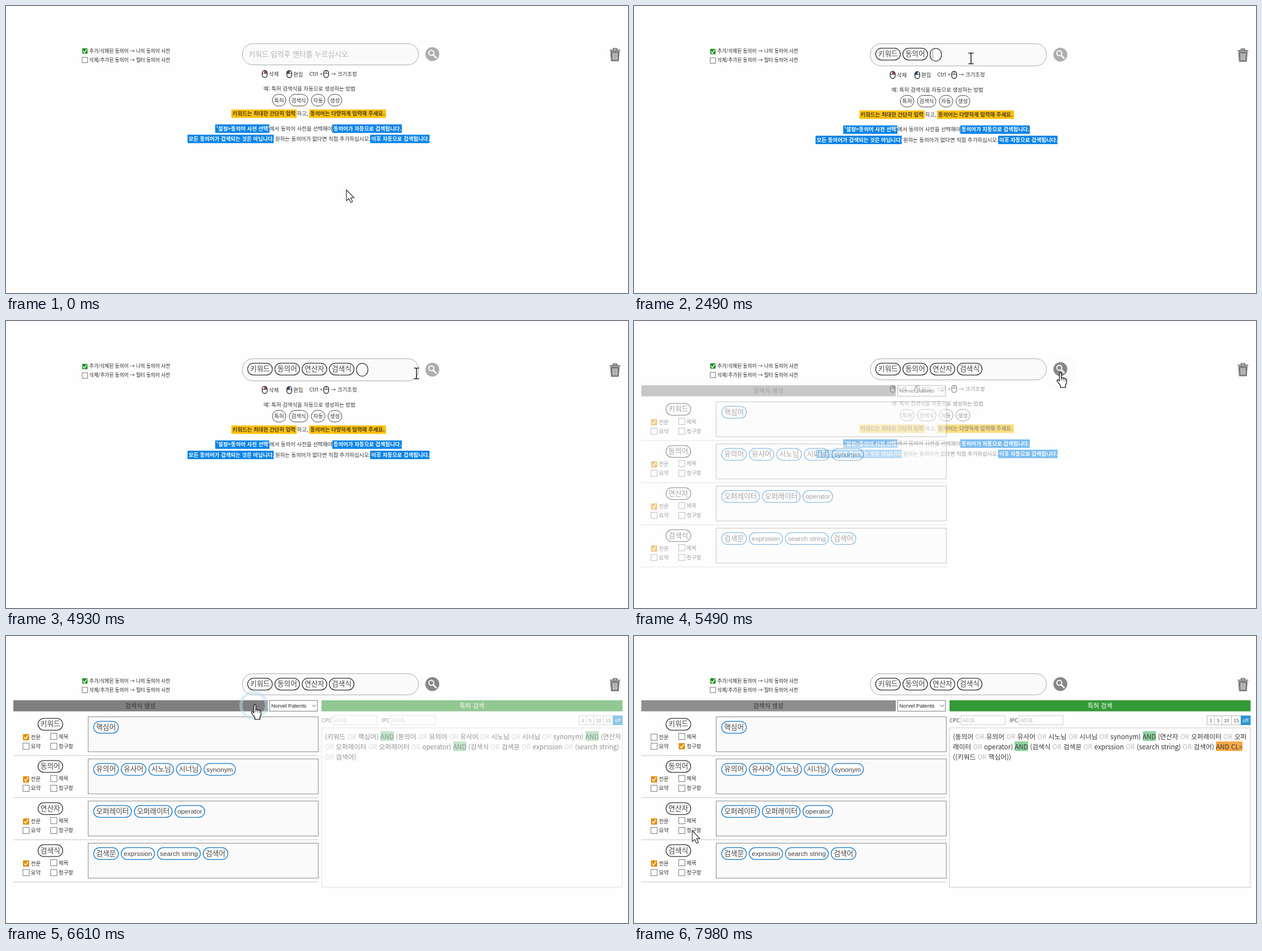
Recreate the animation shown at these times as an HTML page. Size 1100 by 509 pixels, loop 8000 ms.

```html
<!DOCTYPE html>
<html lang="ko">
<head>
<meta charset="utf-8">
<style>
  html, body { margin: 0; width: 100%; height: 100%; overflow: hidden; background: #fefefe; }
  svg { display: block; width: 100vw; height: 100vh; }
  text, .query { font-family: "Noto Sans CJK KR", "Noto Sans CJK", sans-serif; white-space: pre; }
  text.latin { font-family: "Liberation Sans", Arial, sans-serif; }
  .query { font-size: 11.7px; line-height: 17.7px; color: #333; }
  .query i { font-style: normal; color: #bbb; }
  .query b { font-weight: 400; background: #8fd3a0; }
  .query b.claim { background: #f6aa49; }
</style>
</head>
<body>
<svg id="stage" viewBox="0 0 1100 509"></svg>
<script>
const LOOP = 8000;
const HANGUL = '"Noto Sans CJK KR","Noto Sans CJK",sans-serif';
const LATIN = '"Liberation Sans",Arial,sans-serif';
const CLICKS = [[800, 594, 92], [5110, 753, 92], [6330, 438, 123], [7390, 87, 196]];
const FOCUS = 840, SEARCH = 5200, GENERATE = 6350, CLAIM = 7430;

// Each word: start time, time of Enter, states of the syllable composition
const WORDS = [
  [1390, 1840, 'ㅋ 키 킹 키우 키워 키웓 키워드'],
  [1930, 2480, 'ㄷ 도 동 동ㅇ 동으 동의 동읭 동의어'],
  [2620, 3130, 'ㅇ 여 연 연ㅅ 연사 연산 연산ㅈ 연산자'],
  [3210, 3800, 'ㄱ 거 검 검ㅅ 검새 검색 검색ㅅ 검색시 검색식'],
].map(([start, end, states]) => ({ start, end, states: states.split(' ') }));

const ROWS = [
  ['키워드', '핵심어'],
  ['동의어', '유의어', '유사어', '시노님', '시너님', 'synonym'],
  ['연산자', '오퍼레이터', '오퍼래이터', 'operator'],
  ['검색식', '검색문', 'exprssion', 'search string', '검색어'],
];

const POINTER = [
  [0, 602, 326], [220, 602, 326], [780, 596, 93], [4610, 596, 93], [4930, 726, 93],
  [5080, 754, 92], [5950, 754, 92], [6300, 440, 122], [6800, 440, 122],
  [7330, 86, 195], [7760, 86, 195], [7900, 97, 268], [7980, 103, 345], [8000, 104, 350],
];

const pen = document.createElement('canvas').getContext('2d');
const isLatin = s => /^[a-z ]+$/.test(s);
const clamp = v => Math.max(0, Math.min(1, v));
const swing = (t, start, length) => .5 - Math.cos(clamp((t - start) / length) * Math.PI) / 2;

const text = (x, y, s, size = 9.4, fill = '#333', extra = '') =>
  `<text x="${x}" y="${y}" font-size="${size}" fill="${fill}" ${extra}>${s}</text>`;
const rect = (x, y, w, h, fill, stroke = 'none', extra = '') =>
  `<rect x="${x}" y="${y}" width="${w}" height="${h}" fill="${fill}" stroke="${stroke}" ${extra}/>`;
const path = (d, stroke, width = 1, fill = 'none') =>
  `<path d="${d}" stroke="${stroke}" stroke-width="${width}" fill="${fill}" stroke-linecap="round" stroke-linejoin="round"/>`;
const group = (id, body, extra = '') => `<g id="${id}" ${extra}>${body}</g>`;
const MIDDLE = 'text-anchor="middle"';

function textWidth(s) {
  pen.font = isLatin(s) ? `11.7px ${LATIN}` : `12.6px ${HANGUL}`;
  return pen.measureText(s).width;
}

function pill(x, cy, s, stroke) {
  const w = textWidth(s) + 9;
  const latin = isLatin(s);
  return {
    w,
    svg: rect(x, cy - 10.5, w, 21, '#fcfcfc', stroke, 'rx="10.5" stroke-width="1.25"') +
      text(x + 4.5, cy + (latin ? 4 : 3.8), s, latin ? 11.7 : 12.6, '#444', latin ? 'class="latin"' : ''),
  };
}

function pillRow(x, cy, words, stroke, gap) {
  let svg = '';
  for (const word of words) {
    const p = pill(x, cy, word, stroke);
    svg += p.svg;
    x += p.w + gap;
  }
  return { svg, x };
}

function checkbox(cx, cy, color, size = 11) {
  const h = size / 2;
  return color
    ? rect(cx - h, cy - h, size, size, color, 'none', 'rx="1"') +
      path(`M${cx - 3} ${cy + .4}l2.2 2.6 4-6`, '#fff', 1.5)
    : rect(cx - h, cy - h, size, size, '#fff', '#777', 'stroke-width="1"');
}

function mouseIcon(cx, cy, left, right) {
  const l = cx - 4.3, r = cx + 4.3, top = cy - 6;
  return path(`M${l} ${cy - 1}v-1a4.3 4 0 0 1 4.3-4v5z`, 'none', 0, left) +
    path(`M${r} ${cy - 1}v-1a4.3 4 0 0 0-4.3-4v5z`, 'none', 0, right) +
    rect(l, top, 8.6, 12.4, 'none', '#222', 'rx="4.2" stroke-width="1.3"') +
    path(`M${l} ${cy - 1}H${r}M${cx} ${top}V${cy - 1}`, '#222', .9);
}

function marked(x, y, w, s, fill, color) {
  return rect(x, y - 10.5, w, 15, fill, 'none', 'rx="1"') +
    text(x + 2, y, s, 9.4, color, 'font-weight="700"');
}

function options() {
  return checkbox(139.5, 79.8, '#219021', 9.5) + checkbox(139.5, 95.8, '', 9.5) +
    text(147.5, 82.6, '추가/삭제된 동의어 → 나의 동의어 사전', 8.6, '#222', 'font-weight="500"') +
    text(147.5, 98.6, '삭제/추가된 동의어 → 필터 동의어 사전', 8.6, '#222', 'font-weight="500"');
}

function icons() {
  const trash = path('M1068.5 78.5h17M1074 78v-2.5h6V78', '#7a7a7a', 2.2) +
    path('M1069.5 80.5h15l-1.2 17h-12.6z', '#7a7a7a', 1, '#7a7a7a') +
    path('M1073.7 83.5l.4 11.5M1077 83.5V95M1080.3 83.5l-.4 11.5', '#fff', 1.3);
  return '<circle id="lens" cx="754" cy="85.3" r="12.3"/>' +
    '<circle cx="752.2" cy="83" r="4.4" fill="none" stroke="#fff" stroke-width="2"/>' +
    path('M755.8 86.8l4.6 4.8', '#fff', 2.8) + trash;
}

function help() {
  const blue = '#0984e6', yellow = '#fdc20c';
  const examples = [['특허', 471, 24], ['검색식', 501, 33], ['자동', 540, 24], ['생성', 569.5, 24.5]];
  return mouseIcon(457.5, 120.3, 'none', '#d44') + text(465, 124.3, '삭제') +
    mouseIcon(501, 120.6, '#2563b0', 'none') + text(508, 124.6, '편집') +
    text(536.5, 123.6, 'Ctrl +') + mouseIcon(566.2, 120.3, 'none', 'none') +
    text(574, 123.6, '→ 크기조정') +
    text(455.5, 150, '예: 특허 검색식을 자동으로 생성하는 방법') +
    examples.map(([s, x, w]) => rect(x, 156.7, w, 20.6, '#fff', '#444', 'rx="10.3"') +
      text(x + w / 2, 170.5, s, 9.4, '#333', MIDDLE)).join('') +
    marked(398.5, 194, 115.5, '키워드는 최대한 간단히 입력', yellow, '#4a3d1c') +
    text(514.5, 194, '하고,') +
    marked(536, 194, 136, '동의어는 다양하게 입력해 주세요.', yellow, '#4a3d1c') +
    marked(370, 220.5, 96, "'설정&gt;동의어 사전 선택'", blue, '#fff') +
    text(466, 220.5, '에서 동의어 사전을 선택해야') +
    marked(577, 220.5, 123, '동의어가 자동으로 검색됩니다.', blue, '#fff') +
    marked(321, 238.8, 152.5, '모든 동의어가 검색되는 것은 아닙니다.', blue, '#fff') +
    text(476, 238.8, '원하는 동의어가 없다면 직접 추가하십시오.') +
    marked(644, 238.8, 105, '이후 자동으로 검색됩니다.', blue, '#fff');
}

function resultRow([keyword, ...synonyms], i) {
  const y = i * 74.7;
  const orange = '#e18f0a';
  const boxes = (whole, claim) => checkbox(35.5, 179.5 + y, whole) + checkbox(84.5, 178 + y) +
    checkbox(35.5, 195.5 + y) + checkbox(84.5, 195.5 + y, claim);
  const labels = [['전문', 44, 182.5], ['제목', 93, 181.5], ['요약', 44, 198.7], ['청구항', 93, 198.7]];
  return pill(78.5 - (textWidth(keyword) + 9) / 2, 156.6 + y, keyword, '#333').svg +
    (i ? boxes(orange, '') : group('wholeOn', boxes(orange, '')) + group('claimOn', boxes('', orange))) +
    labels.map(([s, x, ly]) => text(x, ly + y, s, 9.4, '#333', 'font-weight="500"')).join('') +
    rect(145.3, 143.3 + y, 407, 62, '#fafafa', '#888') +
    pillRow(155, 161.8 + y, synonyms, '#1478c8', 5).svg +
    path(`M13 ${212 + y}H552`, '#c4c4c4');
}

function results() {
  return rect(13, 114, 450, 19.6, '#8e8e8e', 'none', 'id="bar"') +
    text(237.5, 127.8, '검색식 생성', 11, '#333', MIDDLE) +
    rect(466.2, 114.3, 84.5, 19, '#fff', '#777') +
    text(469, 127.2, 'Norvel Patents', 9.5, '#222', 'class="latin"') +
    path('M542 122.5l2.8 2.8 2.8-2.8', '#444') +
    ROWS.map(resultRow).join('');
}

const query = (id, html) => `<foreignObject id="${id}" x="564" y="169.2" width="536" height="270">
  <div class="query" xmlns="http://www.w3.org/1999/xhtml">${html
    .replace(/\bAND CL=/g, '<b class="claim">AND CL=</b>')
    .replace(/\bAND\b(?! CL)/g, '<b>AND</b>')
    .replace(/\bOR\b/g, '<i>OR</i>')
    .replace(/\n/g, '<br/>')}</div></foreignObject>`;

function searchPanel() {
  const field = (x, label, bx) => text(x, 153.3, label, 9.6, '#444') +
    rect(bx, 141.4, 78, 16, '#fff', '#ccc') + text(bx + 3, 152.8, 'A01B..', 8.6, '#b5b5b5');
  const steps = [['3', 1013.5, 13], ['5', 1026.5, 13], ['10', 1039.5, 17], ['15', 1056.5, 17], ['off', 1073.5, 16.5]];
  return rect(558, 114, 532.5, 19.6, '#359a38') +
    text(824, 127.8, '특허 검색', 11, '#fff', MIDDLE) +
    field(558, 'CPC', 578.3) + field(664, 'IPC', 680.8) +
    steps.map(([s, x, w]) => rect(x, 141.5, w, 16, s === 'off' ? '#2b97d3' : '#fff', s === 'off' ? '#2b97d3' : '#bbb') +
      text(x + w / 2, 152.6, s, 8, s === 'off' ? '#fff' : '#444', MIDDLE)).join('') +
    rect(558, 163, 532, 282.5, '#fff', '#c8c8c8') +
    query('queryAll', '(키워드 OR 핵심어) AND (동의어 OR 유의어 OR 유사어 OR 시노님 OR 시너님 OR synonym) AND (연산자\n' +
      'OR 오퍼레이터 OR 오퍼래이터 OR operator) AND (검색식 OR 검색문 OR exprssion OR (search string)\nOR 검색어)') +
    query('queryClaim', '(동의어 OR 유의어 OR 유사어 OR 시노님 OR 시너님 OR synonym) AND (연산자 OR 오퍼레이터 OR 오퍼\n' +
      '래이터 OR operator) AND (검색식 OR 검색문 OR exprssion OR (search string) OR 검색어) AND CL=\n((키워드 OR 핵심어))');
}

const CURSORS = {
  arrow: path('M0 0v19.5l4.4-4 3.2 7 3.3-1.5-3.2-6.8h5.8z', '#333', 1.2, '#fff'),
  beam: path('M-4-9.5h2.8q1.2 0 1.2 1.2 0-1.2 1.2-1.2H4M0-8.5v17M-4 9.5h2.8Q0 9.5 0 8.3q0 1.2 1.2 1.2H4', '#222', 1.5),
  hand: path('M-1.6 1.2a1.7 1.7 0 0 1 3.4 0v8l1.2-.6 2 .6 1.2-.2 1.8.9 1.4.1 1.5 1.7v6l-1.8 4.2v4H.2v-3.2L-5 15.6q-1.6-2.2-.3-3.2 1.4-.8 2.6.6l1.1 1.2z', '#222', 1.4, '#fff') +
    path('M1.8 9v4M5 10v3.4M8.2 11v3', '#222', .9),
};

const stage = document.getElementById('stage');
stage.innerHTML =
  group('options', options()) +
  rect(418, 66.8, 311.5, 37.6, '#fafafa', '#aaa', 'id="field" rx="18.8"') +
  group('entry', '') + group('icons', icons()) + group('help', help()) +
  group('results', results()) + group('panel', searchPanel()) +
  '<circle id="ring" fill="none" stroke="#b9dfe9" stroke-width="5.5"/>' +
  group('cursor', Object.entries(CURSORS).map(([id, body]) => group(id, body)).join(''));

const el = {};
stage.querySelectorAll('[id]').forEach(node => el[node.id] = node);
const set = (id, name, value) => el[id].setAttribute(name, value);
const show = (id, on) => set(id, 'visibility', on ? 'visible' : 'hidden');
const fade = (id, opacity) => { set(id, 'opacity', opacity); show(id, opacity > 0); };

function typedAt(t) {
  const done = WORDS.filter(w => t >= w.end).map(w => w.states.at(-1));
  const word = WORDS.find(w => t >= w.start && t < w.end);
  if (!word) return { done, draft: '' };
  const pace = (word.end - word.start - 40) / word.states.length;
  const i = Math.min(word.states.length - 1, Math.floor((t - word.start) / pace));
  return { done, draft: word.states[i] };
}

function entryMarkup(t, done, draft) {
  if (t < FOCUS) return text(429, 89.7, '키워드 입력후 엔터를 누르십시오.', 12.8, '#b4b4b4');
  const row = pillRow(427.3, 85.3, draft ? [...done, draft] : done, '#333', 4.4);
  if (t >= SEARCH) return row.svg;
  const caretOn = !(t >= 4100 && t < 4440) && t < 4910;
  const caretX = draft ? row.x - 8.5 : row.x + 4.8;
  return row.svg +
    (draft ? '' : rect(row.x, 75, 20, 22.8, '#fcfcfc', '#333', 'rx="10" stroke-width="1.25"')) +
    (caretOn ? path(`M${caretX} 79.5v13.5`, '#888', .9) : '');
}

function pointerAt(t) {
  const i = POINTER.findIndex(p => p[0] > t);
  const [t0, x0, y0] = POINTER[i - 1], [t1, x1, y1] = POINTER[i];
  const k = t1 - t0 > 130 && t < 7760 ? swing(t, t0, t1 - t0) : (t - t0) / (t1 - t0);
  return [x0 + (x1 - x0) * k, y0 + (y1 - y0) * k];
}

function cursorKind(t, x, y) {
  if (Math.hypot(x - 754, y - 86) < 13) return 'hand';
  if (x > 418 && x < 730 && y > 66 && y < 106) return 'beam';
  const overBar = t > SEARCH && x < 463 && y > 113 && y < 134;
  const overBox = t > SEARCH && x > 79 && x < 119 && y > 188 && y < 202;
  return overBar || overBox ? 'hand' : 'arrow';
}

let lastEntry = '';
function draw(t) {
  const { done, draft } = typedAt(t);
  const tall = t >= FOCUS && t < SEARCH && !draft;
  const markup = entryMarkup(t, done, draft);
  if (markup !== lastEntry) el.entry.innerHTML = lastEntry = markup;
  set('field', 'height', tall ? 39.4 : 37.6);
  for (const id of ['options', 'icons']) set(id, 'transform', `translate(0 ${tall ? .9 : 0})`);
  set('help', 'transform', `translate(0 ${tall ? 1.8 : 0})`);
  set('lens', 'fill', t < SEARCH - 60 ? '#adadad' : '#878787');

  const shown = swing(t, SEARCH, 600);
  fade('help', 1 - shown);
  fade('results', shown);
  fade('panel', swing(t, GENERATE, 500));
  show('queryAll', t >= GENERATE && t < CLAIM);
  fade('queryClaim', swing(t, CLAIM, 250));
  show('wholeOn', t >= SEARCH && t < CLAIM);
  show('claimOn', t >= CLAIM);

  const [x, y] = pointerAt(t);
  const kind = cursorKind(t, x, y);
  set('cursor', 'transform', `translate(${x} ${y})`);
  for (const id in CURSORS) show(id, id === kind);
  set('bar', 'fill', t > SEARCH && kind === 'hand' && x < 463 && y < 134 ? '#7f7f7f' : '#8e8e8e');

  const click = CLICKS.find(([start]) => t >= start && t < start + 400);
  show('ring', click);
  if (click) {
    const age = (t - click[0]) / 400;
    set('ring', 'cx', click[1]);
    set('ring', 'cy', click[2]);
    set('ring', 'r', 27 * Math.sqrt(age));
    set('ring', 'opacity', Math.min(.75, (1 - age) * 1.7));
  }
}

const begin = performance.now();
function tick() {
  draw((performance.now() - begin) % LOOP);
  requestAnimationFrame(tick);
}
tick();
</script>
</body>
</html>
```
